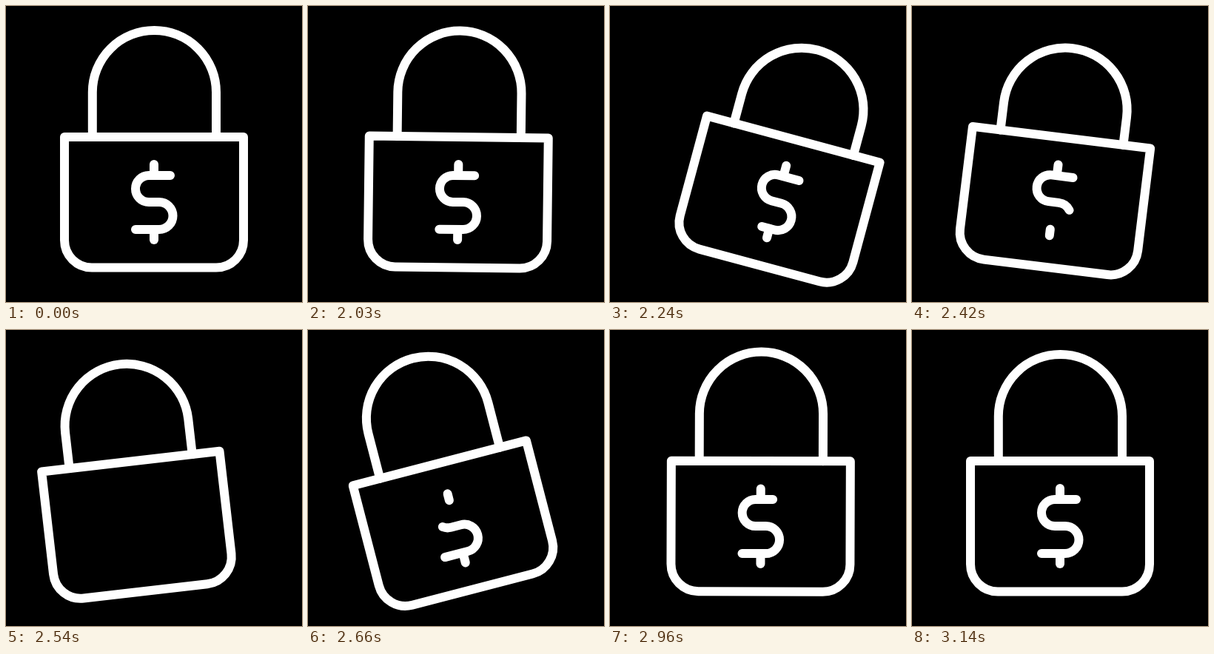
An HTML page for the animation above (3170 ms loop, 400 by 400 pixels).

```html
<!DOCTYPE html>
<html lang="en">
<head>
<meta charset="utf-8">
<title>Swinging padlock</title>
<style>
  html, body { margin: 0; height: 100%; overflow: hidden; background: #000; }
  svg { display: block; width: 100%; height: 100%; }
</style>
</head>
<body>
<svg viewBox="0 0 400 400" fill="none" stroke="#fff" stroke-width="12" stroke-linecap="round" stroke-linejoin="round">
  <g id="lock">
    <path id="shackle"/>
    <path d="M79 177H321V316.5a37 37 0 0 1-37 37H116a37 37 0 0 1-37-37Z"/>
    <g id="dollar">
      <path pathLength="1" d="M200 214V229"/>
      <path pathLength="1" d="M222 229H193a18 18 0 0 0 0 36H207a18.5 18.5 0 0 1 0 37H175"/>
      <path pathLength="1" d="M200 302V316"/>
    </g>
  </g>
</svg>
<script>
const LOOP = 3170, REST = 2000, STEP = 30;
const [lock, shackle, dollar] = ['lock', 'shackle', 'dollar'].map(id => document.getElementById(id));

// Keys are [step, value]
const shift = [[0, 0], [1, 2.7], [7.7, 25], [14, -8.7], [16.8, -24], [22, 0], [25, 8.3], [27, 8], [38, 0]];
const angle = [[0, 0], [1, 0.7], [8.5, 15.2], [14, 7], [21.7, -14.7], [27, 0.3], [38, 0]];
const drop = [[0, 0], [8, 19.2], [13, 23.3], [22, -2], [25, -11], [27, -8], [38, 0]];
const wipe = [[0, 0], [8, 0.077], [14, 0.38], [18, 1], [22, 1.61], [27, 1.884], [38, 2]];

// Slope at a key: flat at the ends and at turning points
function slope(keys, i) {
  if (i === 0 || i === keys.length - 1) return 0;
  const [[t0, a], [, b], [t1, c]] = keys.slice(i - 1, i + 2);
  return (b - a) * (c - b) <= 0 ? 0 : (c - a) / (t1 - t0);
}

// Cubic Hermite interpolation through the keys
function sample(keys, t) {
  const i = Math.max(1, keys.findIndex(key => key[0] >= t));
  const [t0, a] = keys[i - 1], [t1, b] = keys[i];
  const span = t1 - t0, u = (t - t0) / span, v = 1 - u;
  return a * v * v * (1 + 2 * u) + b * u * u * (3 - 2 * u)
    + span * u * v * (v * slope(keys, i - 1) - u * slope(keys, i));
}

function draw() {
  const time = performance.now() % LOOP;
  const step = Math.min(38, Math.max(0, Math.floor((time - REST) / STEP)));

  lock.setAttribute('transform',
    `translate(${sample(shift, step)}) rotate(${sample(angle, step)} 200 265.25)`);
  shackle.setAttribute('d',
    `M116.8 177V${116.5 + sample(drop, step)}a83.6 83.6 0 0 1 167.2 0V177`);

  // The sign is wiped away from its tail, then redrawn from its tail
  const w = sample(wipe, step);
  const from = w < 1 ? 0 : 2 - w, length = w < 1 ? 1 - w : w - 1;
  dollar.setAttribute('stroke-dasharray', `${length} 3`);
  dollar.setAttribute('stroke-dashoffset', -from);
  dollar.setAttribute('visibility', length > 0.001 ? 'visible' : 'hidden');

  requestAnimationFrame(draw);
}
draw();
</script>
</body>
</html>
```
